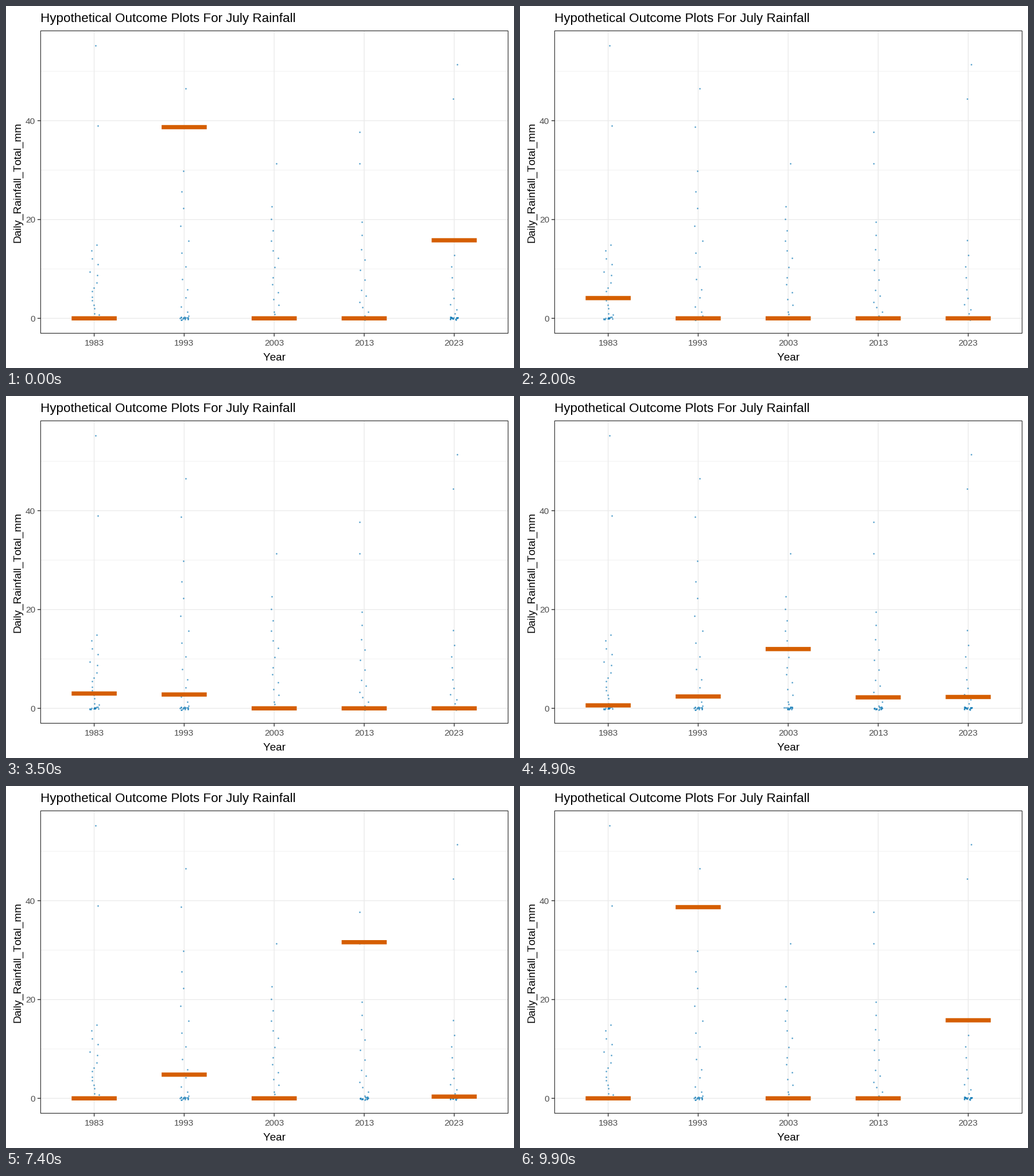
A matplotlib script that plays this animation: 885 by 632 pixels, repeating every 10 s.

```python
import matplotlib.pyplot as plt
import numpy as np
from matplotlib.animation import FuncAnimation
from matplotlib.patches import Rectangle

W, H, DPI = 885, 632, 100
PX = 72 / DPI
LEFT, RIGHT, TOP, BOTTOM = 60.4, 874.7, 43.4, 571.4
ZERO, PER_MM = 545.3, 8.625
BAR_W, BAR_H = 78.6, 7.4
BLUE, ORANGE, DARK, GRID = "#0072B2", "#D55E00", "#333333", "#EBEBEB"
DAYS, OUTCOMES, FRAMES = 31, 20, 100

# Per year: the two wettest days, then the start, length and power
# of the curve that the other wet days follow (mm)
RAIN = {
    1983: (55.4, 39.3, 15.0, 16, 1.5),
    1993: (46.5, 38.9, 29.7, 13, 1.7),
    2003: (31.1, 22.7, 20.1, 13, 1.4),
    2013: (37.6, 31.5, 19.4, 13, 1.9),
    2023: (51.2, 44.3, 15.9, 10, 1.9),
}

# Outcomes that drew a wet day, as {outcome: mm}; the others drew a dry one
DRAWS = {
    1983: {3: 6.2, 4: 4.1, 7: 3, 9: 1.2, 16: 10.5, 18: 3, 19: 3},
    1993: {0: 38.7, 1: 29.6, 2: 19.7, 5: 46.4, 7: 2.8, 10: 4.8, 15: 4.8, 19: 29.6},
    2003: {6: 20.1, 9: 12, 10: 12, 11: 9.45, 12: 9.45},
    2013: {9: 4.45, 11: 15.6, 13: 16.2, 15: 31.6},
    2023: {0: 15.8, 1: 15.8, 10: 4.6, 12: 44.35, 13: 44.35, 15: .35},
}


def year_x(year):
    return 153.6 + 15.68 * (year - 1983)


def mm_y(mm):
    return ZERO - PER_MM * mm


def daily_rain(first, second, start, wet, power):
    curve = start * (1 - np.arange(wet) / wet) ** power
    return np.concatenate([[first, second], curve, np.zeros(DAYS - wet - 2)])


# Each outcome holds, then one halfway step leads to the next
starts = [5 * k - (k > OUTCOMES // 2) for k in range(OUTCOMES + 1)]
key_times = [t for a, b in zip(starts, starts[1:]) for t in (a, b - 2)] + [starts[-1]]


def bar_path(draws):
    held = [draws.get(k, 0) for k in range(OUTCOMES)]
    return np.interp(range(FRAMES), key_times, np.append(np.repeat(held, 2), held[0]))


plt.rcParams["font.family"] = "Liberation Sans"
plt.rcParams["text.kerning_factor"] = 6
fig = plt.figure(figsize=(W / DPI, H / DPI), dpi=DPI, facecolor="white")
ax = fig.add_axes([0, 0, 1, 1])
ax.set_xlim(0, W)
ax.set_ylim(H, 0)
ax.axis("off")


def line(x0, y0, x1, y1, color, width=1.4):
    ax.plot([x0, x1], [y0, y1], color=color, lw=width * PX, snap=False,
            solid_capstyle="butt", zorder=1)


def label(x, y, text, size, color="black", ha="center", rotation=0):
    ax.text(x, y, text, fontsize=size * PX, color=color, ha=ha, va="baseline",
            rotation=rotation, rotation_mode="anchor")


for mm in (10, 30, 50):
    line(LEFT, mm_y(mm), RIGHT, mm_y(mm), GRID, .7)
for mm in (0, 20, 40):
    y = mm_y(mm)
    line(LEFT, y, RIGHT, y, GRID)
    line(LEFT - 5.5, y, LEFT, y, DARK)
    label(51, y + 5.6, str(mm), 15.4, "#4D4D4D", "right")

rng = np.random.default_rng(7)
bars, paths = [], []
for year, rain in RAIN.items():
    x = year_x(year)
    line(x, TOP, x, BOTTOM, GRID)
    line(x, BOTTOM, x, BOTTOM + 5.5, DARK)
    label(x, 593.3, str(year), 15.4, "#4D4D4D")

    dots_x = x + rng.uniform(-8, 8, DAYS)
    dots_y = mm_y(daily_rain(*rain) + rng.uniform(-.28, .28, DAYS))
    ax.scatter(dots_x, dots_y, s=(2.7 * PX) ** 2, color=BLUE, alpha=.65,
               linewidths=0, zorder=2)

    bars.append(ax.add_patch(Rectangle((x - BAR_W / 2, 0), BAR_W, BAR_H, fc=ORANGE,
                                       ec="none", snap=False, zorder=3)))
    paths.append(bar_path(DRAWS[year]))

ax.add_patch(Rectangle((LEFT, TOP), RIGHT - LEFT, BOTTOM - TOP, fill=False,
                       ec=DARK, lw=1.2 * PX, snap=False, zorder=4))
label(60.2, 28, "Hypothetical Outcome Plots For July Rainfall", 22.4, ha="left")
label(467.5, 619, "Year", 19)
label(25, 307.5, "Daily_Rainfall_Total_mm", 19, rotation=90)


def update(n):
    for bar, path in zip(bars, paths):
        bar.set_y(mm_y(path[n]) - BAR_H / 2)
    return bars


anim = FuncAnimation(fig, update, frames=FRAMES, interval=100, repeat=True,
                     repeat_delay=0, blit=False)
plt.show()
```
